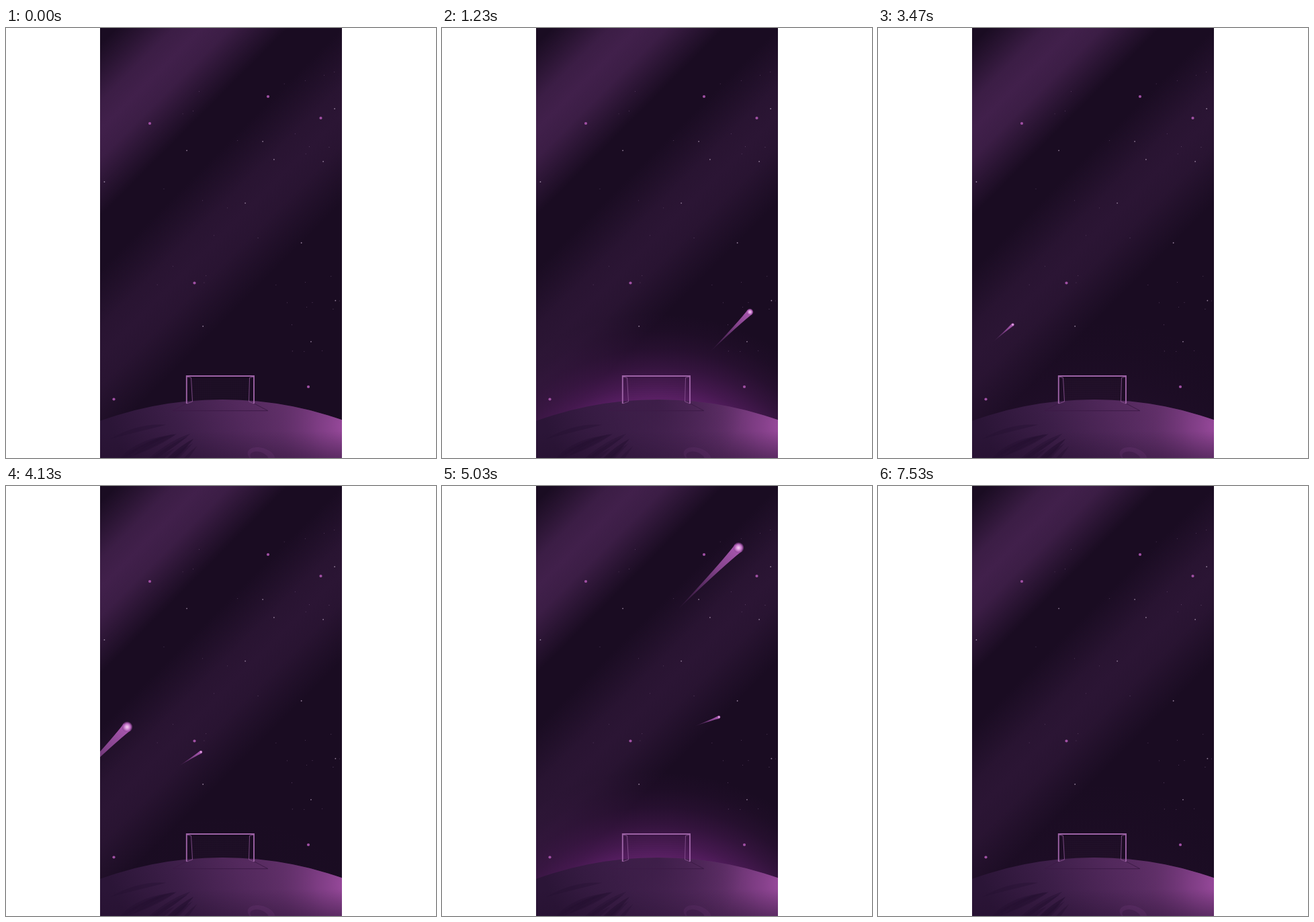
An HTML page with a canvas that plays this animation: 640 by 640 pixels, repeating every 8030 ms.

```html
<!DOCTYPE html>
<html lang="en">
<head>
<meta charset="utf-8">
<title>Goal on a small planet</title>
<style>
html, body { margin: 0; width: 100%; height: 100%; overflow: hidden; background: #fff; }
canvas { display: block; width: 100vmin; height: 100vmin; }
</style>
</head>
<body>
<canvas id="stage" width="640" height="640"></canvas>
<script>
const ctx = document.getElementById('stage').getContext('2d');
const LOOP = 8030;
const TAU = Math.PI * 2;
const LEFT = 140, WIDTH = 360, HEIGHT = 640;
const PLANET = { x: 322, y: 1091, r: 538 };
const BRIGHT_STARS = [[390, 102], [468.5, 134], [214, 142], [280.5, 379.5], [450, 534], [160.5, 552.5]];

function smooth(from, to, v) {
  const k = Math.min(1, Math.max(0, (v - from) / (to - from)));
  return k * k * (3 - 2 * k);
}

function seededRandom(seed) {
  return () => (seed = (seed * 16807) % 2147483647) / 2147483647;
}

const rgba = (rgb, alpha) => `rgba(${rgb},${alpha})`;

// Spreads the colours evenly along the gradient.
function spread(gradient, colors) {
  colors.forEach((color, i) => gradient.addColorStop(i / (colors.length - 1), color));
  return gradient;
}
const linear = (x1, y1, x2, y2, ...colors) =>
  spread(ctx.createLinearGradient(x1, y1, x2, y2), colors);
const radial = (x, y, inner, outer, ...colors) =>
  spread(ctx.createRadialGradient(x, y, inner, x, y, outer), colors);

function fillScene(fill) {
  ctx.fillStyle = fill;
  ctx.fillRect(LEFT, 0, WIDTH, HEIGHT);
}

function disc(x, y, r, fill) {
  ctx.fillStyle = fill;
  ctx.beginPath();
  ctx.arc(x, y, r, 0, TAU);
  ctx.fill();
}

function line(points, color, width) {
  ctx.beginPath();
  points.forEach(([x, y]) => ctx.lineTo(x, y));
  ctx.strokeStyle = color;
  ctx.lineWidth = width;
  ctx.stroke();
}

// Diagonal light band; distances are measured along x + y from the top left corner.
function band(center, reach, rgb) {
  const from = (center - reach) / 2, to = (center + reach) / 2;
  fillScene(linear(LEFT + from, from, LEFT + to, to,
    rgba(rgb, 0), rgba(rgb, 0.42), rgba(rgb, 0.86), rgba(rgb, 1),
    rgba(rgb, 0.86), rgba(rgb, 0.42), rgba(rgb, 0)));
}

function sky() {
  fillScene('#1a0c22');
  band(152, 128, '65,32,75');
  band(490, 130, '43,21,52');
}

function stars() {
  const random = seededRandom(41);
  for (let i = 0; i < 44; i++) {
    const x = LEFT + WIDTH * Math.sqrt(random());
    const y = 60 + 430 * random();
    if (i % 4) disc(x, y, 0.55, 'rgba(176,140,182,.4)');
    else disc(x, y, 0.9, '#95809b');
  }
  BRIGHT_STARS.forEach(([x, y]) => disc(x, y, 2.1, '#a050a4'));
}

function horizonGlow(level) {
  const rgb = '108,36,120';
  ctx.globalAlpha = level;
  fillScene(radial(320, 760, 205, 335,
    rgba(rgb, 0.8), rgba(rgb, 0.52), rgba(rgb, 0.31), rgba(rgb, 0.15), rgba(rgb, 0.05), rgba(rgb, 0)));
  ctx.globalAlpha = 1;
}

function comet(x, y, r, angle) {
  const length = r * 16.5;
  ctx.save();
  ctx.translate(x, y);
  ctx.rotate(-angle);
  ctx.fillStyle = linear(0, 0, -length, 0, '#a958b0', 'rgba(150,76,158,.85)', 'rgba(130,64,140,.5)', 'rgba(110,55,120,0)');
  ctx.beginPath();
  ctx.moveTo(0, -r * 0.9);
  ctx.quadraticCurveTo(-length * 0.25, -r * 0.38, -length, 0);
  ctx.quadraticCurveTo(-length * 0.25, r * 0.38, 0, r * 0.9);
  ctx.fill();
  disc(0, 0, r, radial(0, 0, 0, r, '#f3d0f2', '#dd9fdf', '#b565ba', 'rgba(130,62,140,.4)'));
  ctx.restore();
}

function comets(t) {
  const first = (t - 1230) * 0.26;
  comet(458 + first, 423 - first, 5.1, Math.PI / 4);

  const large = (t - 4130) * 0.29;
  comet(180 + large, 359 - large * 1.022, 7.9, 0.793);

  const small = (t - 4130) * 0.1356;
  comet(290 + small, 396 - 0.474 * small + 0.00039 * small ** 2, 2.4, 0.567 - 0.0017 * small);
}

// Tapered shadows fanning out from the crest towards the lower left.
function streaks() {
  const random = seededRandom(7);
  ctx.fillStyle = 'rgba(36,16,49,.4)';
  for (let i = 0; i < 14; i++) {
    const angle = 2.1 + 0.9 * random();
    const near = 40 + 60 * random();
    ctx.save();
    ctx.translate(325, 572);
    ctx.rotate(angle);
    ctx.beginPath();
    ctx.moveTo(near, 0);
    ctx.quadraticCurveTo(near + 30, -8 * random(), near + 60 + 50 * random(), -3);
    ctx.quadraticCurveTo(near + 40, 8 + 4 * random(), near, 0);
    ctx.fill();
    ctx.restore();
  }
}

function crater() {
  const ring = (x, y, rx, ry, fill) => {
    ctx.fillStyle = fill;
    ctx.beginPath();
    ctx.ellipse(x, y, rx, ry, 0.3, 0, TAU);
    ctx.fill();
  };
  ring(380, 637, 21, 12, 'rgba(130,66,138,.3)');
  ring(377, 639, 14, 8, 'rgba(60,27,72,.45)');
}

function planet(level) {
  ctx.save();
  ctx.beginPath();
  ctx.arc(PLANET.x, PLANET.y, PLANET.r, 0, TAU);
  ctx.clip();
  fillScene(linear(180, 650, 440, 540, '#2b1537', '#3c1e48', '#53295d', '#63316b'));
  fillScene(radial(515, 592, 0, 155, 'rgba(166,80,168,.95)', 'rgba(142,68,147,.6)', 'rgba(110,53,117,.2)', 'rgba(90,44,98,0)'));
  streaks();
  crater();
  fillScene(linear(0, 600, 0, 640, 'rgba(35,14,45,0)', 'rgba(35,14,45,.35)'));
  ctx.globalAlpha = level;
  fillScene(radial(320, 555, 0, 130, 'rgba(50,24,62,.6)', 'rgba(50,24,62,.3)', 'rgba(50,24,62,0)'));
  ctx.restore();
}

function goal() {
  const thin = '#85508e', net = 'rgba(110,72,122,.1)';
  for (let x = 278; x < 362; x += 3) line([[x, 523], [x, 554]], net, 0.6);
  for (let y = 523; y < 555; y += 3) line([[277, y], [362, y]], net, 0.6);
  line([[268, 559], [248, 569.7], [390, 569.7], [369.5, 559]], '#3d1b47', 1);
  line([[269, 519], [275.5, 520.5], [277.5, 556], [269, 559]], thin, 0.9);
  line([[369, 519], [362.5, 520.5], [361.5, 556], [369, 559]], thin, 0.9);
  line([[268.8, 559], [268.8, 518], [369, 518], [369, 559]], '#9c62a5', 1.9);
}

function draw(now) {
  const t = now % LOOP;
  const phase = t % (LOOP / 2);
  const level = smooth(60, 1100, phase) * (1 - smooth(2500, 3680, phase));
  ctx.fillStyle = '#fff';
  ctx.fillRect(0, 0, 640, 640);
  ctx.save();
  ctx.beginPath();
  ctx.rect(LEFT, 0, WIDTH, HEIGHT);
  ctx.clip();
  sky();
  horizonGlow(level);
  stars();
  comets(t);
  planet(level);
  goal();
  ctx.restore();
}

const start = performance.now();
function tick() {
  draw(performance.now() - start);
  requestAnimationFrame(tick);
}
tick();
</script>
</body>
</html>
```
